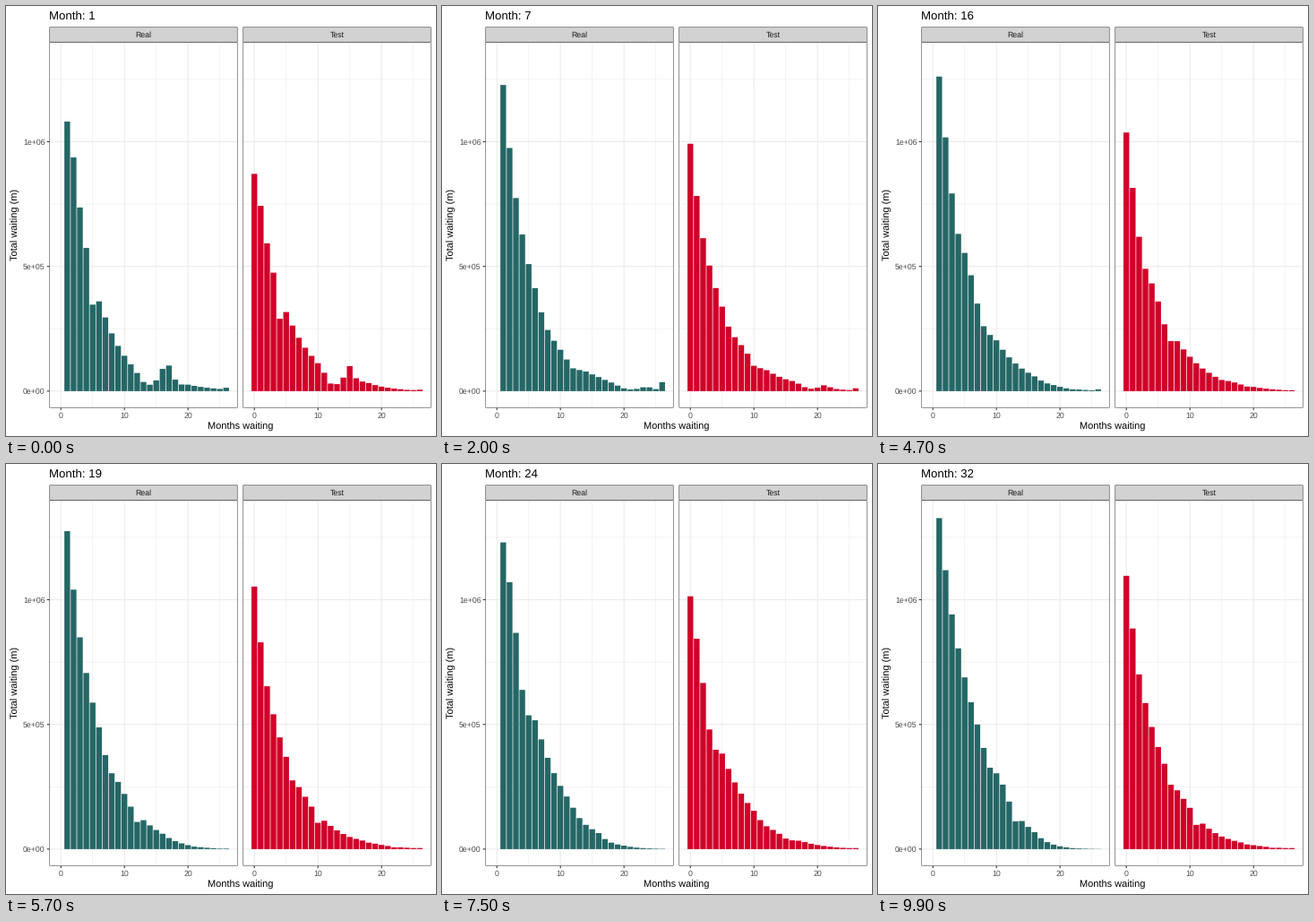
A matplotlib script that plays this animation: 480x480 px, repeating every 10 s.

```python
import numpy as np
import matplotlib.pyplot as plt
from matplotlib.animation import FuncAnimation
from matplotlib.patches import Rectangle

FRAMES, MONTHS, LAST = 100, 32, 26
plt.rcParams.update({
    "font.family": ["Liberation Sans", "DejaVu Sans"],
    "path.snap": False,
    "text.hinting": "none",
})

# Stage geometry in pixels
WIDTH = 210
STEP = WIDTH / 29.59
STRIP, TOP, BOTTOM = 23.5, 40.5, 448.5
BASE, HALF_M, PEAK = 429.9, 139.2, 371

# Key ages and the bar heights there in the first and the last month
AGES = [0, 2, 5, 10, 15, 18, 25]
REAL = dict(first=1, start=[335, 205, 105, 31, 15, 9, 2],
            end=[370, 262, 164, 72, 19, 5, 0.2],
            pace=1.13, winter=9.4, lull=-10.2, pile=9)
TEST = dict(first=0, start=[270, 165, 90, 32, 13, 9, 1.2],
            end=[311, 195, 114, 47, 14, 7.5, 1.2],
            pace=1.0, winter=9.0, lull=-11.5, pile=2)


def bump(d, width):
    return np.exp(-(d / width) ** 2)


def yearly(joined, month):
    """Bump that comes back every twelve months."""
    return bump((joined - month + 6) % 12 - 6, 0.6)


def month_heights(m, first, start, end, pace, winter, lull, pile):
    """Decay by age, times the size of the group that joined the queue back then."""
    age = np.arange(LAST + 1 - first)
    u = (m - 1) / (MONTHS - 1)
    decay = np.interp(age, AGES, (1 - u) * np.log(start) + u * np.log(end))
    joined = m - age / pace
    intake = (-0.31 * yearly(joined, winter) - 0.12 * yearly(joined, winter + 3.8)
              - bump(joined - lull, 1.3) + 0.85 * bump(joined - lull + 2.75, 1.1))
    heights = np.exp(decay + intake)
    heights[-1] += pile * bump(m - 8, 5.5)
    return np.minimum(heights, PEAK)


def build_track(spec):
    """Straight tween between months, each pinned to its nearest frame."""
    months = np.arange(1, MONTHS + 1)
    stops = np.round((months - 1) * (FRAMES - 1) / (MONTHS - 1))
    states = np.array([month_heights(m, **spec) for m in months])
    frames = np.arange(FRAMES)
    return np.column_stack([np.interp(frames, stops, col) for col in states.T])


fig = plt.figure(figsize=(6, 6), dpi=80, facecolor="white")
ax = fig.add_axes([0, 0, 1, 1])
ax.axis("off")
PT = 72 / fig.dpi


def label(x, y, text, px, color="black", ha="center", va="baseline", **kw):
    return ax.text(x, y, text, fontsize=px * PT, color=color, ha=ha, va=va, **kw)


def line(x0, y0, x1, y1, color, px, z):
    ax.plot([x0, x1], [y0, y1], color=color, lw=px * PT, zorder=z,
            solid_capstyle="butt")


def box(x, y, w, h, fill, z):
    """Rectangle whose thin border lies inside its edge."""
    t = 0.54
    ax.add_patch(Rectangle((x + t / 2, y + t / 2), w - t, h - t, fc=fill,
                           ec="#333333", lw=t * PT, zorder=z))


def draw_panel(left, name, color, first):
    right, zero = left + WIDTH, left + 1.795 * STEP
    for k in range(6):
        px = 0.53 if k % 2 else 1.07
        x, y = zero + 5 * k * STEP, BASE - k * HALF_M / 2
        line(x, TOP, x, BOTTOM, "#EBEBEB", px, 1)
        line(left, y, right, y, "#EBEBEB", px, 1)
    for v in (0, 10, 20):
        x = zero + v * STEP
        line(x, BOTTOM, x, BOTTOM + 2.7, "#333333", 1.07, 2)
        label(x, 460, str(v), 8.8, "#4D4D4D")
    box(left, TOP, WIDTH, BOTTOM - TOP, "none", 4)
    box(left, STRIP, WIDTH, TOP - STRIP, "#D2D2D2", 5)
    label(left + WIDTH / 2, 35, name, 8.8, "#1A1A1A", zorder=6)
    xs = zero + np.arange(first, LAST + 1) * STEP
    return ax.bar(xs, np.zeros(len(xs)), 0.9 * STEP, bottom=BASE, color=color,
                  lw=0, zorder=3)


panels = [
    (draw_panel(48.5, "Real", "#256766", REAL["first"]), build_track(REAL)),
    (draw_panel(264.5, "Test", "#D00029", TEST["first"]), build_track(TEST)),
]

for k, text in enumerate(("0e+00", "5e+05", "1e+06")):
    y = BASE - k * HALF_M
    line(45.7, y, 48.5, y, "#333333", 1.07, 2)
    label(43.5, y + 3, text, 8.8, "#4D4D4D", ha="right")
label(261.5, 473, "Months waiting", 11)
label(15.9, 243.8, "Total waiting (m)", 11, ha="right", va="center", rotation=90)
title = label(48.5, 15.3, "", 13.2, ha="left")
ax.set(xlim=(0, 480), ylim=(480, 0))


def update(frame):
    month = 1 + (MONTHS - 1) * frame / (FRAMES - 1)
    title.set_text(f"Month: {round(month)}")
    for bars, track in panels:
        for bar, h in zip(bars, track[frame]):
            bar.set_height(-h)
    return []


anim = FuncAnimation(fig, update, frames=FRAMES, interval=100, repeat=True,
                     repeat_delay=0, init_func=lambda: update(0))
plt.show()
```
